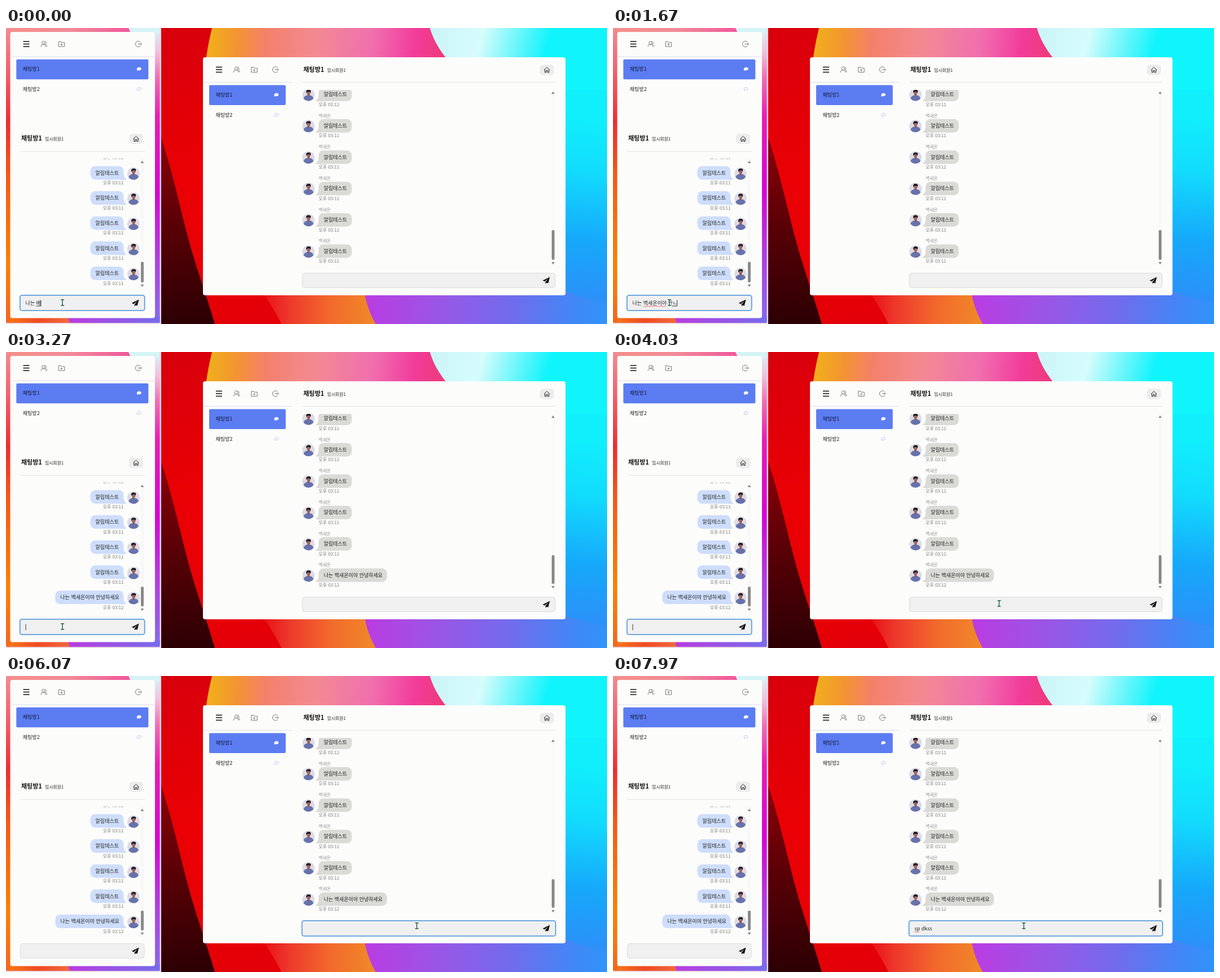
These frames come from a looping animation (1065x526 px, 8 s). An HTML page:

```html
<!DOCTYPE html>
<html lang="ko">
<head>
<meta charset="utf-8">
<title>채팅방</title>
<style>
html, body { margin: 0; width: 100%; height: 100%; overflow: hidden; }
svg { display: block; width: 100vw; height: 100vh; }
text { font-family: "Noto Sans CJK KR", "Noto Sans CJK", "Noto Sans", sans-serif; white-space: pre; }
</style>
</head>
<body>
<svg id="stage" viewBox="0 0 1065 526" xmlns="http://www.w3.org/2000/svg"></svg>
<script>
const LOOP = 8000;
const NAME = '백새온';
const MEMBER = '임시회원1';
const MESSAGE = `나는 ${NAME}이야 안녕하세요`;
const SENT_AT = 3000, CLICK_AT = 4250;
const stage = document.getElementById('stage');

// ---------- drawing helpers ----------
const rect = (x, y, w, h, fill, r = 0, extra = '') =>
  `<rect x="${x}" y="${y}" width="${w}" height="${h}" rx="${r}" fill="${fill}" ${extra}/>`;
const path = (d, fill = 'none', stroke = 'none', width = 1, extra = '') =>
  `<path d="${d}" fill="${fill}" stroke="${stroke}" stroke-width="${width}" ${extra}/>`;
// y is the optical middle of the line
const label = (x, y, size, str, fill = '#222', extra = '') =>
  `<text x="${x}" y="${y + size * 0.36}" font-size="${size}" fill="${fill}" ${extra}>${str}</text>`;
const at = (x, y, body, extra = '') => `<g transform="translate(${x} ${y})" ${extra}>${body}</g>`;
const gradient = (id, [x1, y1, x2, y2], stops) =>
  `<linearGradient id="${id}" gradientUnits="userSpaceOnUse" x1="${x1}" y1="${y1}" x2="${x2}" y2="${y2}">` +
  stops.map(([o, c]) => `<stop offset="${o}" stop-color="${c}"/>`).join('') + '</linearGradient>';
const clip = (id, x, y, w, h, r = 0) =>
  `<clipPath id="${id}">${rect(x, y, w, h, '#000', r)}</clipPath>`;

// ---------- wallpaper ----------
const defs = `<defs>
${gradient('warm', [362, 20, 770, 60], [[0, '#f0ae1c'], [.11, '#f39530'], [.24, '#f3806a'], [.45, '#f38a92'], [.7, '#f06fae'], [.88, '#f23c9c'], [1, '#ee3a7a']])}
${gradient('red', [275, 0, 420, 526], [[0, '#d8000c'], [.5, '#ea0004'], [1, '#e40008']])}
${gradient('maroon', [290, 200, 310, 526], [[0, '#8a0008'], [.45, '#5a0006'], [1, '#2c0004']])}
${gradient('ember', [455, 0, 650, 0], [[0, '#e8101a'], [.25, '#ee3a2c'], [.6, '#f2682c'], [1, '#f0882a']])}
${gradient('ice', [760, 20, 950, 70], [[0, '#cdf5f8'], [.4, '#d6fcfc'], [.75, '#62f6fa'], [1, '#10f4fc']])}
${gradient('sea', [1040, 150, 1010, 500], [[0, '#10f0fc', 0], [.3, '#12dcfe'], [.65, '#16a8fa'], [1, '#2f8cf8']])}
${gradient('violet', [640, 480, 1065, 520], [[0, '#ba3ce2'], [.3, '#9a56e6'], [.6, '#716cec'], [.85, '#4386f6'], [1, '#2f94fa']])}
${gradient('sideL', [0, 0, 0, 524], [[0, '#f48a90'], [.15, '#f2606c'], [.32, '#ee2e30'], [.5, '#f45a14'], [.8, '#f98204'], [1, '#f4661c']])}
${gradient('sideR', [0, 0, 0, 524], [[0, '#d8f6f8'], [.08, '#f0c2dc'], [.17, '#f06cb2'], [.3, '#ea1cb4'], [.55, '#d804d4'], [.78, '#b23ee2'], [1, '#846cee']])}
${gradient('topL', [0, 0, 225, 0], [[0, '#f49088'], [.5, '#f28a98'], [1, '#f0559c']])}
${gradient('baseL', [110, 0, 273, 0], [[0, '#b83ce0'], [1, '#766cec']])}
${gradient('baseWarm', [0, 0, 112, 0], [[0, '#f67c14'], [.5, '#f04a24'], [1, '#f0683c']])}
${clip('desk', 275, 0, 790, 526)}
${clip('panel', 0, 0, 272.5, 524, 2)}
${clip('listL', 8, 232, 238, 230)}
${clip('listR', 510, 110, 455, 320)}
</defs>`;

const wallpaper = rect(0, 0, 1065, 526, '#ead9e2') +
  `<g clip-path="url(#desk)">` +
  rect(275, 0, 790, 526, 'url(#red)') +
  path('M275 195C292 245 304 300 321 366C336 424 354 470 370 526H275Z', 'url(#maroon)') +
  path('M365 0C361 18 357 34 354 60L480 300H900L785 0Z', 'url(#warm)') +
  path('M455 470C468 490 480 508 488 526H660V470Z', 'url(#ember)') +
  path('M751 0C758 22 769 42 786 60L900 300H1065V0Z', 'url(#ice)') +
  rect(980, 110, 85, 416, 'url(#sea)') +
  path('M635 470C639 492 646 510 655 526H1065V488C1040 484 1010 476 985 466Z', 'url(#violet)') +
  `</g><g clip-path="url(#panel)">` +
  rect(0, 0, 136, 524, 'url(#sideL)') + rect(136, 0, 137, 524, 'url(#sideR)') +
  rect(8, 0, 250, 9, 'url(#topL)') + path('M217 0Q219 5 222 10H273V0Z', '#d4f4f6') +
  rect(7, 512, 106, 12, 'url(#baseWarm)') + path('M109 512L113 524H273V512Z', 'url(#baseL)') + '</g>';

// ---------- interface pieces ----------
const ink = '#666';
const menuIcon = path('M-5.5 -4.5H5.5M-5.5 0H5.5M-5.5 4.5H5.5', 'none', '#111', 1.3);
const peopleIcon = path('M-1 -5a2.6 2.9 0 1 0 .1 0ZM-5.3 5C-5.2 1.8 -3.5 .6 -1 .6S3 2 3.2 5M1.6 -4.7C4.6 -4.2 4.6 -.2 2.4 .4C4.3 1 5.2 2.6 5.3 4.6', 'none', ink, .9);
const folderIcon = path('M-5.2 4.5V-4.3H-1.2L.2 -2.7H5.2V4.5ZM0 -.9V2.7M-1.8 .9H1.8', 'none', ink, .9);
const exitIcon = path('M3.8 -3.4A5.1 5.1 0 1 0 3.8 3.4M-1 0H5.6M3.7 -1.9L5.6 0L3.7 1.9', 'none', ink, .9);
const homeIcon = path('M-5 .2L0 -4.7L5 .2M-3.6 -1V4.4H-1.2V1H1.2V4.4H3.6V-1', 'none', '#222', 1);
const planeIcon = path('M6.5 -6L-6.2 .3L-2.7 2L4 -3.4L-1.2 2.8V6L1 3.9L3.6 5.2Z', '#0a0a0a');
const cloud = (fill, stroke) => path('M-3.4 1.6C-4.4 -.6 -2.4 -2.7 0 -2.6C3 -2.7 4.5 -.6 3.2 1.2C2.4 2.3 0 2.5 -1.4 2.1L-3 3.2Z', fill, stroke, .7);
const avatar = '<circle r="11" fill="#dedbe8"/>' +
  path('M-8.8 6.6C-7.5 2.2 -4 .8 0 .6C4.5 .8 7.8 2.4 8.9 6.4A11 11 0 0 1 -8.8 6.6Z', '#6672ac') +
  path('M-1.8 -2H2V1.6L.2 3L-1.8 1.4Z', '#8d5a50') +
  '<ellipse cx=".2" cy="-3.6" rx="3" ry="3.8" fill="#9a6557"/>' +
  path('M-3.6 -3C-5.2 -7 -2.4 -9.4 .6 -8.8C4.6 -9.2 5 -5.4 3.2 -3.4C3 -5.2 1.8 -6 -1.2 -5.8C-2.6 -5.4 -2.4 -4 -3.6 -3Z', '#15131a');
const homeButton = (x, y) => rect(x - 12.5, y - 9, 25, 18, '#ececec', 5) + at(x, y, homeIcon);
const title = (x, y) => label(x, y, 11, '채팅방1', '#111', 'font-weight="700"') +
  label(x + 42, y + 1, 7.8, MEMBER, '#222', 'font-weight="500"');
const line = (x1, x2, y, color) => path(`M${x1} ${y}H${x2}`, 'none', color, 1);

const rooms = (x, y, w) => rect(x, y, w, 35.5, '#5c7cf2', 2) +
  label(x + 11.5, y + 17.5, 9, '채팅방1', '#121a38') +
  label(x + 11.5, y + 53, 9, '채팅방2') +
  at(x + w - 16.5, y + 17, cloud('#fff', '#e8e8ff')) +
  at(x + w - 16.5, y + 52.5, cloud('#f6f4ff', '#b9b4e0'));

const toolbar = (x, y, exitX) => at(x, y, menuIcon) + at(x + 31.3, y, peopleIcon) +
  at(x + 62.5, y, folderIcon) + at(exitX, y, exitIcon);

const scrollArrows = (x, top, bottom) =>
  path(`M${x - 2.7} ${top + 2}H${x + 2.7}L${x} ${top - 2}ZM${x - 2.7} ${bottom - 2}H${x + 2.7}L${x} ${bottom + 2}Z`, '#7d7d7d');

// A message with middle y; own messages sit to the right of the list
function message(own, y, text, time) {
  const w = text === MESSAGE ? 121 : 58.7;
  const color = own ? '#cdddfb' : '#dadad7';
  const x = own ? 208.3 - w : 554;
  const tail = own
    ? `M201 ${y + 12}Q209 ${y + 13.5} 214 ${y + 11}Q208.6 ${y + 9} 208.3 ${y + 2}Z`
    : `M561 ${y + 12}Q553 ${y + 13.5} 548 ${y + 11}Q553.7 ${y + 9} 554 ${y + 2}Z`;
  return rect(x, y - 12, w, 24, color, 8.5) + path(tail, color) +
    label(x + 9, y, 9, text) +
    at(own ? 226 : 536, y + (own ? 1.3 : .6), avatar) +
    (own ? label(208.3, y + 17.7, 7.9, time, '#777', 'text-anchor="end"')
         : label(554, y + 17.8, 7.9, time, '#777') + label(554, y - 18, 7.8, NAME, '#999'));
}

function messages(own, sent) {
  const count = 6, last = own ? 436 : 396.6, step = own ? 44.65 : 55.72;
  return Array.from({ length: count }, (_, i) => {
    const fresh = sent && i === count - 1;
    return message(own, last - (count - 1 - i) * step, fresh ? MESSAGE : '알림테스트', fresh ? '오후 03:12' : '오후 03:11');
  }).join('');
}

const scene = defs + wallpaper +
  rect(7.5, 7, 256.5, 508.5, '#fcfcfb', 4) + toolbar(36, 28.5, 234.5) + line(8, 264, 51, '#dcdcec') +
  rooms(18.3, 55.7, 234) + title(27, 196.5) + homeButton(230.5, 197) + line(25, 246, 219.3, '#e4e4e4') +
  rect(238.5, 233, 6, 228, '#f8f8f8') + scrollArrows(241.5, 238, 458) +
  rect(349, 52, 642.5, 423, '#fcfcfb', 4) + toolbar(377.5, 74, 477.5) + line(349, 507, 96.7, '#dcdcec') +
  rooms(360, 101.6, 135.7) + title(527, 74) + homeButton(958.5, 74.5) + line(525, 974, 96.5, '#e4e4e4') +
  rect(966.5, 110, 6, 311, '#f9f9f9') + scrollArrows(969.5, 115, 418) +
  [false, true].map(sent => `<g id="${sent ? 'after' : 'before'}">` +
    `<g clip-path="url(#listL)">${messages(true, sent)}</g><g clip-path="url(#listR)">${messages(false, sent)}</g>` +
    rect(239, sent ? 417 : 415.5, 5, sent ? 35 : 36.5, '#8a8a8a', 2) +
    rect(967, sent ? 361 : 359, 5, sent ? 51 : 53, '#8a8a8a', 2) + '</g>').join('') +
  '<g id="inputs"></g>' +
  at(0, 0, path('M-3 -5.5Q0 -5.5 0 -3.8Q0 -5.5 3 -5.5M0 -4.5V4.5M-3 5.2Q0 5.2 0 3.8Q0 5.2 3 5.2', 'none', '#fff', 2.8) +
    path('M-3 -5.2H3M0 -5V5M-3 5H3', 'none', '#1d5c4c', 1.5), 'id="pointer"');
stage.innerHTML = scene;
const part = id => document.getElementById(id);
const before = part('before'), after = part('after'), inputs = part('inputs'), pointer = part('pointer');

// ---------- typing ----------
const HANGUL = 8.28, SPACE = 2.02;
const LATIN = { s: 4.2, p: 5.58, d: 5.58, k: 4.97, ' ': SPACE };
const widthOf = str => [...str].reduce((sum, c) => sum + (LATIN[c] || HANGUL), 0);
const opening = ['배', '백', '백ㅅ', '백새', '백생', '백새오', '백새온', '백새온ㅇ', '백새온이', '백새온잉', '백새온이야',
  '백새온이야 ', '백새온이야 ㅇ', '백새온이야 아', '백새온이야 안', '백새온이야 안ㄴ'];
const greeting = ['녀', '녕', '녕ㅎ', '녕하', '녕핫', '녕하세', '녕하셍', '녕하세요'].map(s => '백새온이야 안' + s);
const timeline = (words, start, gap) => words.map((text, i) => ({ text, time: start + i * gap }));
const leftKeys = [
  ...timeline(opening.map(s => '나는 ' + s), 0, 108),
  ...timeline(greeting.map(s => '나는 ' + s), 1760, 115),
  { text: '', time: SENT_AT }
];
const reply = 'sp dkss';
const rightKeys = [{ text: '', time: CLICK_AT },
  ...timeline([...reply].map((_, i) => reply.slice(0, i + 1)), 6640, 132)];
const current = (keys, t) => keys.filter(k => k.time <= t).pop() || { text: '', time: 0 };

function squiggle(x, y, w) {
  let d = `M${x} ${y}`;
  for (let i = 1; i * 1.4 <= w; i++) d += `L${x + i * 1.4} ${y + (i % 2 ? 1.3 : 0)}`;
  return path(d, 'none', '#e0403c', .8);
}

function field(x, y, w, { text, time }, t, focused, showPlane) {
  let out = focused
    ? rect(x - .2, y - .2, w + .4, 27.4, '#f0f0f0', 4, 'stroke="#5b9fe0" stroke-width="1.8"')
    : rect(x + .5, y + .5, w - 1, 26, '#f0f0f0', 4, 'stroke="#dcdcdc" stroke-width="1"');
  const mid = y + 14, start = x + 9.5, end = start + widthOf(text);
  out += label(start, mid, 9, text);
  if (text.includes('이야 ')) out += squiggle(start + widthOf('나는 '), mid + 5, widthOf('백새온이야'));
  if (text.startsWith('sp ')) out += squiggle(start, mid + 5, widthOf('sp'));
  if (/[ㄱ-힣]$/.test(text) && text !== MESSAGE) out += line(end - HANGUL, end, mid + 5, '#333');
  if (focused && (t - time) % 1000 < 500) out += path(`M${end + .5} ${mid - 5.5}V${mid + 5.5}`, 'none', '#222', .9);
  return out + (showPlane ? at(x + w - 16.5, y + 13.5, planeIcon) : '');
}

function render(t) {
  const sent = t >= SENT_AT, onRight = t >= CLICK_AT;
  before.style.display = sent ? 'none' : '';
  after.style.display = sent ? '' : 'none';
  inputs.innerHTML =
    field(25, 475, 220.5, current(leftKeys, t), t, !onRight, t < 2740 || t >= 2960) +
    field(524.7, 435, 449, current(rightKeys, t), t, onRight, true);
  const p = Math.min(1, Math.max(0, (t - 3360) / 800));
  const ease = p * p * (3 - 2 * p);
  pointer.setAttribute('transform', `translate(${100 + 628 * ease} ${488 - 44 * ease})`);
}

const began = performance.now();
function tick(now) {
  render(Math.max(0, now - began) % LOOP);
  requestAnimationFrame(tick);
}
render(0);
requestAnimationFrame(tick);
</script>
</body>
</html>
```
